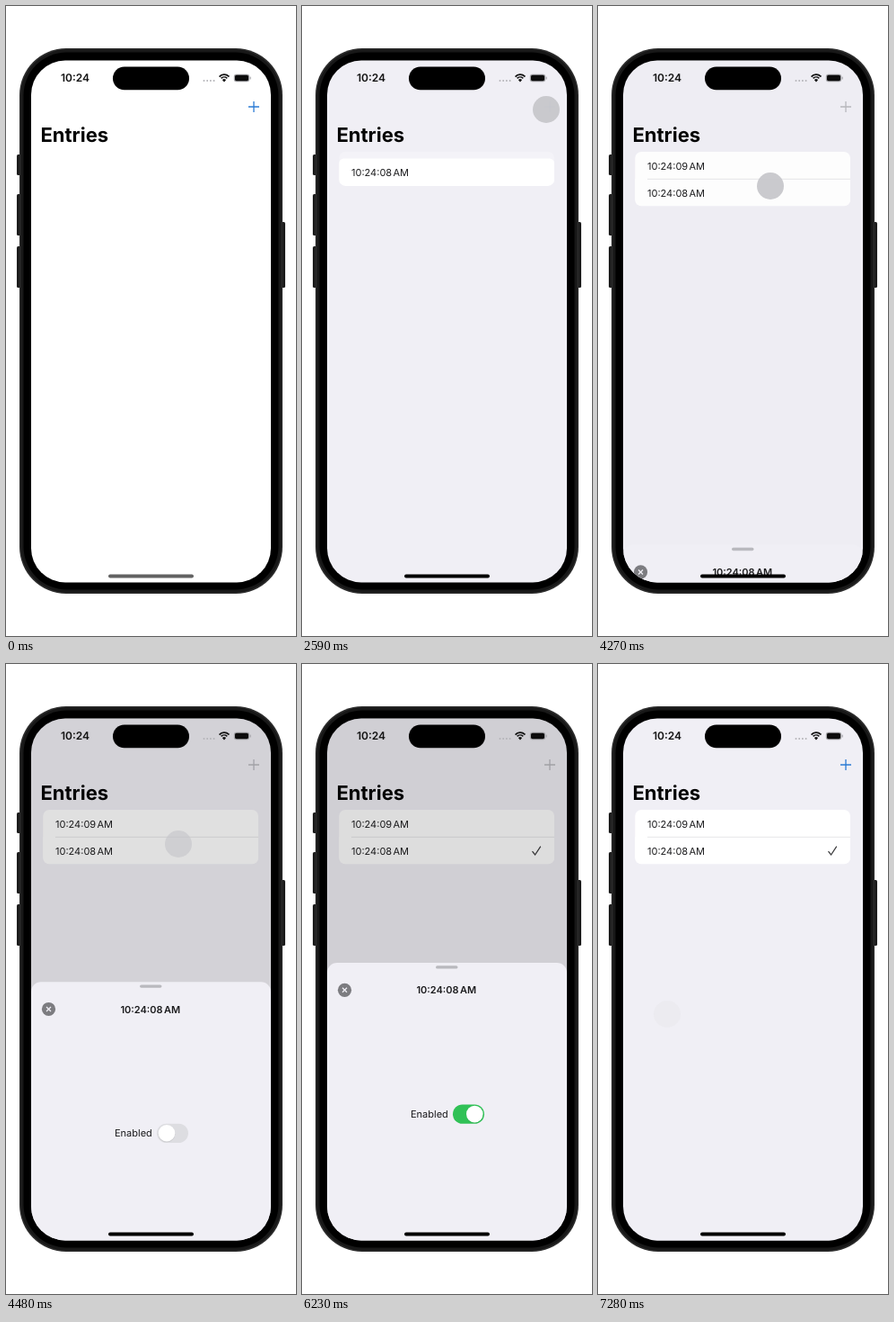
An HTML page with a canvas for the animation above (8000 ms loop, 323x700 px).

```html
<!DOCTYPE html>
<html lang="en">
<head>
<meta charset="utf-8">
<title>Entries</title>
<style>
  html, body { margin: 0; width: 100%; height: 100%; overflow: hidden; background: #fff; }
  canvas { display: block; width: 323px; height: 700px; }
</style>
</head>
<body>
<canvas id="stage"></canvas>
<script>
const W = 323, H = 700, LOOP = 8000, STEP = 70;
const SHEET_OPEN = 332, SHEET_CLOSED = 640;
const SHEET_IN = 4234, SHEET_OUT = 6750;
const canvas = document.getElementById('stage');
const ctx = canvas.getContext('2d');
const scale = window.devicePixelRatio || 1;
canvas.width = W * scale;
canvas.height = H * scale;
ctx.scale(scale, scale);
ctx.textRendering = 'geometricPrecision';

const clamp = x => Math.max(0, Math.min(1, x));
const ramp = (t, a, b) => clamp((t - a) / (b - a));
const ease = x => x * x * (3 - 2 * x);
const mix = (a, b, p) => a + (b - a) * p;
const mixRgb = (a, b, p) => `rgb(${a.map((v, i) => Math.round(mix(v, b[i], p)))})`;

// Critically damped spring from 0 to 1.
function spring(t, start) {
  const x = Math.max(0, t - start) * 0.0177;
  return 1 - (1 + x) * Math.exp(-x);
}

function box(x, y, w, h, r, fill) {
  ctx.beginPath();
  ctx.roundRect(x, y, w, h, r);
  ctx.fillStyle = fill;
  ctx.fill();
}

function disc(x, y, r, fill) {
  ctx.beginPath();
  ctx.arc(x, y, r, 0, Math.PI * 2);
  ctx.fillStyle = fill;
  ctx.fill();
}

function path(points, color, width) {
  ctx.beginPath();
  points.forEach(([x, y]) => ctx.lineTo(x, y));
  ctx.strokeStyle = color;
  ctx.lineWidth = width;
  ctx.stroke();
}

function text(str, x, y, size, weight = 400, color = '#1c1c1e') {
  ctx.font = `${weight} ${size}px Inter, "Open Sans", sans-serif`;
  ctx.textBaseline = 'alphabetic';
  ctx.fillStyle = color;
  ctx.fillText(str, x, y);
}

// Time label with a narrow gap before the suffix.
function clock(str, x, y, weight) {
  text(str, x, y, 11, weight);
  text('AM', x + ctx.measureText(str).width + 1.3, y, 11, weight);
}

function withAlpha(a, draw) {
  ctx.save();
  ctx.globalAlpha *= clamp(a);
  draw();
  ctx.restore();
}

function drawPhone() {
  [[12, 165, 23], [12, 209, 46], [12, 267, 46], [305, 240, 73]]
    .forEach(([x, y, h]) => box(x, y, 6, h, 1.5, '#1d1d1d'));
  box(15, 47, 293, 606, 52, '#2b2b2b');
  box(16.5, 48.5, 290, 603, 51, '#181818');
  box(19.5, 51.5, 284, 597, 48, '#000');
}

function drawStatus() {
  text('10:24', 61, 84.2, 12, 600, '#111');
  box(119, 67.6, 85, 25.6, 12.8, '#000');
  for (let i = 0; i < 4; i++) disc(220.5 + i * 3.7, 83, 1, '#b4b4b8');
  [[7.4, 1.8], [4.6, 1.7]].forEach(([r, w]) => {
    ctx.beginPath();
    ctx.arc(243, 83.6, r, -Math.PI * 0.76, -Math.PI * 0.24);
    ctx.strokeStyle = '#111';
    ctx.lineWidth = w;
    ctx.stroke();
  });
  ctx.beginPath();
  ctx.moveTo(243, 84.4);
  ctx.arc(243, 83.6, 2.5, -Math.PI * 0.8, -Math.PI * 0.2);
  ctx.fillStyle = '#111';
  ctx.fill();
  box(253.8, 75.8, 17.4, 8.4, 2.6, '#a5a5a9');
  box(255, 76.7, 15, 6.6, 1.8, '#0c0c0c');
  box(271.5, 78.5, 1.2, 3, 0.6, '#a5a5a9');
}

function drawPlus(t) {
  const tint = ramp(t, 4190, 4270) * (1 - ramp(t, 6750, 7050));
  const first = ramp(t, 700, 910) * (1 - 0.5 * ramp(t, 1400, 1750));
  const second = ramp(t, 1890, 2100) * (1 - ramp(t, 2590, 2940));
  const pressed = t < 1890 ? first : Math.max(second, 0.5 * (1 - ramp(t, 1890, 2100)));
  const color = mixRgb([43, 123, 212], [184, 184, 190], tint);
  withAlpha(1 - 0.65 * pressed, () => {
    path([[270, 112], [282, 112]], color, 1.3);
    path([[276, 106], [276, 118]], color, 1.3);
  });
}

function drawList(t) {
  const shown = ramp(t, 1330, 1680);
  if (!shown) return;
  const move = ease(ramp(t, 2475, 2825));
  const fade = ramp(t, 2590, 2940);
  const shift = 30 * move;
  withAlpha(shown, () => {
    if (move > 0) {
      withAlpha(Math.max(move, fade), () => box(41.3, 162, 239.7, 30 + shift, 7, '#fff'));
      const top = 7 * (1 - move);
      box(41.3, 162 + shift, 239.7, 30.3, [top, top, 7, 7], '#fff');
    } else {
      box(41.3, 162, 239.7, 30.3, 7, '#fff');
    }
    clock('10:24:08', 55, 181.5 + shift);
    withAlpha(fade, () => {
      path([[55, 192.3], [281, 192.3]], '#e0e0e3', 0.8);
      clock('10:24:09', 55, 181.5);
    });
  });
  withAlpha(ramp(t, 5460, 5670), () =>
    path([[256.5, 208.2], [259.6, 212], [265.8, 202.7]], '#3a3a3c', 1.25));
}

function drawSheet(t, top) {
  box(28, top, 267, 330, [11, 11, 0, 0], '#f0eff5');
  box(149, top + 3.2, 24.5, 3.4, 1.7, '#b9b9be');
  const y = top + 30.3;
  disc(47.5, y, 7.6, '#7c7c80');
  path([[45, y - 2.5], [50, y + 2.5]], '#f0eff5', 1.3);
  path([[50, y - 2.5], [45, y + 2.5]], '#f0eff5', 1.3);
  clock('10:24:08', 127.4, top + 34.4, 600);

  const on = ease(ramp(t, 5430, 5740));
  text('Enabled', 121, top + 172.2, 11);
  box(168, top + 157.5, 35, 21.3, 10.65, mixRgb([221, 221, 225], [48, 193, 86], on));
  const x = mix(179, 192.3, on);
  disc(x, top + 168.8, 9.5, 'rgba(0,0,0,.08)');
  disc(x, top + 168.1, 9.3, '#fff');
}

function touchAt(t) {
  if (t < 3200) {
    const dip = ramp(t, 1540, 1750) * (1 - ramp(t, 1890, 2100));
    return [272, 115, ramp(t, 700, 910) * (1 - 0.15 * dip) * (1 - ramp(t, 2620, 2940))];
  }
  if (t < 4900) {
    const p = ramp(t, 3640, 3850), q = ramp(t, 3970, 4200);
    return [mix(mix(197, 194, p), 192, q), mix(mix(194, 195, p), 200, q),
      ramp(t, 3570, 3850) * (1 - ramp(t, 4380, 4760))];
  }
  if (t < 6300) {
    const p = ease(ramp(t, 5250, 5900));
    return [mix(182, 188, p), mix(503, 495, p),
      ramp(t, 4970, 5250) * (1 - ramp(t, 5810, 6230))];
  }
  const p = ease(ramp(t, 6860, 7280));
  return [mix(47, 77, p), mix(362, 389, p),
    ramp(t, 6300, 6580) * (1 - ramp(t, 6860, 7340))];
}

function drawScreen(t) {
  const back = ramp(t, 1240, 1400);
  ctx.save();
  ctx.beginPath();
  ctx.roundRect(28, 60.5, 267, 580, 38);
  ctx.clip();
  ctx.fillStyle = mixRgb([255, 255, 255], [240, 239, 245], back);
  ctx.fillRect(28, 60, 267, 581);
  drawPlus(t);
  text('Entries', 38.5, 151.3, 22, 700, '#050505');
  drawList(t);

  const lift = t < SHEET_OUT ? spring(t, SHEET_IN) : 1 - spring(t, SHEET_OUT);
  if (lift > 0) {
    ctx.fillStyle = `rgba(0,0,0,${0.135 * lift ** 1.5})`;
    ctx.fillRect(28, 60, 267, 581);
    drawSheet(t, mix(SHEET_CLOSED, SHEET_OPEN, lift));
  }
  drawStatus();
  box(114, 631.5, 95, 4, 2, mixRgb([98, 98, 98], [0, 0, 0], back));

  const [x, y, alpha] = touchAt(t);
  withAlpha(alpha * 0.95, () => disc(x, y, 15, '#c8c8cc'));
  ctx.restore();
}

function frame(now) {
  const t = Math.min(7280, Math.floor((now % LOOP) / STEP) * STEP);
  ctx.fillStyle = '#fff';
  ctx.fillRect(0, 0, W, H);
  drawPhone();
  drawScreen(t);
  requestAnimationFrame(frame);
}
requestAnimationFrame(frame);
</script>
</body>
</html>
```
